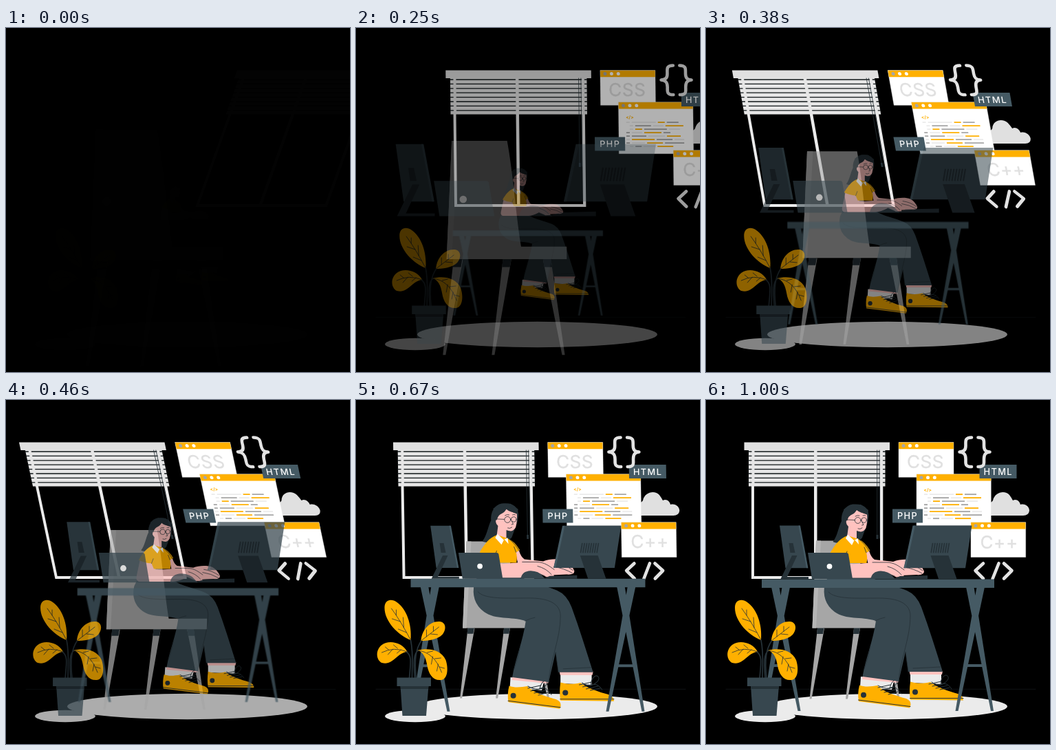
An HTML page for the animation above (1040 ms loop, 500 by 500 pixels).

```html
<!DOCTYPE html>
<html lang="en">
<head>
<meta charset="utf-8">
<title>Coding at a desk</title>
<style>
  html, body { margin: 0; width: 100%; height: 100%; overflow: hidden; background: #000; }
  svg { display: block; width: 100vw; height: 100vh; }
  text { font-family: Inter, "Open Sans", sans-serif; }
  .slate { fill: #37474f; } .steel { fill: #455a64; } .ink { fill: #263238; }
  .amber { fill: #ffb000; } .skin { fill: #ffc2bf; } .pale { fill: #ebebeb; } .gray { fill: #e0e0e0; }
  .line { fill: none; stroke: #263238; stroke-width: .8; stroke-linecap: round; stroke-linejoin: round; }
  .sign { fill: none; stroke: #e3e3e3; stroke-width: 4.6; stroke-linecap: round; stroke-linejoin: round; }
  .big { fill: #e0e0e0; stroke: #e0e0e0; stroke-width: .4; font-size: 26px; letter-spacing: .6px; }
  .tag { fill: #fff; font-size: 12.8px; font-weight: 500; letter-spacing: 1.4px; }
</style>
</head>
<body>
<svg viewBox="0 0 500 500">
  <g id="floor">
    <path d="M29 420.3H479" class="line" style="stroke-width:.4"/>
    <ellipse class="pale" cx="263.5" cy="445.5" rx="174.5" ry="18.7"/>
    <ellipse class="pale" cx="86" cy="459.5" rx="44" ry="8.7"/>
  </g>

  <g id="window">
    <path class="pale" d="M66 73h4v183h87V73h4.500v183H253V73h4.300v187H66z"/>
    <path fill="#e6e6e6" d="M62 73H260.500V125.600H62z"/>
    <g id="slats"></g>
    <path class="gray" d="M55.500 61.500H267V73H55.500z"/>
    <path class="line" d="M248.700 73V198M252 73V201"/>
    <path class="ink" d="M247.500 196h2.800v6h-2.800z"/>
  </g>

  <g id="screens">
    <path class="gray" d="M410 168V150C414 149 416 148 417 146C420 133 435 131 441 138Q444 142 446 146C451 143 456 147 457 152C464 150 470 155 470 161Q469 168 461 168z"/>
    <g id="panels"></g>
    <text class="big" x="292" y="99">CSS</text>
    <text class="big" x="398.500" y="215.500">C++</text>
    <text class="amber" x="316.500" y="132.500" font-size="6.500" font-weight="700">&lt;/&gt;</text>
    <g id="code"></g>
    <path class="steel" d="M397.500 94h54v20h-54zM271 158.500h44v20h-44z"/>
    <text class="tag" x="403.500" y="108.600">HTML</text>
    <text class="tag" x="278" y="173.100">PHP</text>
    <path class="sign" d="M386 54.500C376 54.500 377.500 60 377.500 66S376 75 368.500 75.500C376 76 377.500 80 377.500 86S376 97 386 97M395.500 54.500C405.500 54.500 404 60 404 66S405.500 75 412.500 75.500C405.500 76 404 80 404 86S405.500 97 395.500 97"/>
    <path class="sign" d="M403 237.500 391.500 248 403 259.500M425.500 237.500 416.500 260M433 237.500 444.500 248 433 259.500"/>
  </g>

  <g id="chair">
    <path fill="#a6a6a6" d="M172 332 153.500 434.500H150.500L162 332zM224 332 206 434.500H203L215 332zM258 332H266.500L281.500 434.500H278.500z"/>
    <path class="ink" d="M162 331h9.500l-1.500 9h-9zM215 331h9l-1.500 9h-8.500zM258 331h8.500l1.300 9h-8.500z"/>
    <path fill="#a6a6a6" d="M160 204.500H219.500C226 240 229 285 234.500 318H283.500V331.500H154.500z"/>
    <path fill="#b5b5b5" d="M160 204.500H167L160 331.500H154.500z"/>
  </g>

  <g id="person">
    <!-- socks and shoes -->
    <path class="pale" d="M225 402 273 409 270 421 224 417zM297 396H342V413L297 411z"/>
    <path class="skin" d="M228 401 280 407 279 411 227 406zM295.500 394H344L343 399H296.500z"/>
    <path class="amber" d="M223 414.500C232 418 242 416 249 415C258 424 276 430 291 434Q298 437 297.500 443L296 447.500 222 438Q220 427 223 414.500zM297 409.500C308 413 318 412 326 410C336 418 352 423 366 427Q374 430 374 436.500L297 435.500Q295 424 297 409.500z"/>
    <path class="line" d="M221.500 436 297 445.500M296.500 433.500H374M250 418l18-4M254 422l18-4M259 425l17-4M265 428l14-4M250 415q9 5 16 4c10-5 12 2 18 8M267 419c2-9 7-14 10-11s-3 9-10 11M324 413l18-4M329 416l18-4M334 419l17-4M340 421l14-3M328 410q7 5 13 4c7-4 12 0 16 6M341 414c-1-8 6-17 10-13s-2 10-10 13" style="stroke-width:1"/>
    <g class="ink"><circle cx="229" cy="428.700" r="4"/><circle cx="304" cy="424.500" r="4"/></g>
    <!-- trousers -->
    <path class="slate" d="M178 256H238C252 266 276 270 292 277Q306 283 313 301C324 331 334 363 344 395H294L290 366 280 409 227.500 402C232 375 243 350 247 321C224 314 204 320 187 308Q167 293 173 266z"/>
    <path class="line" d="M178 279C188 290 218 288 252 288C280 288 297 296 297 314C297 346 282 378 280 409M290 366 294 395M246 321Q254 317 260 316M230 391Q236 374 239 358M301 390 341 388"/>
    <!-- hair and head -->
    <path class="ink" d="M197 176C196 162 204 151 216 151.500C229 151 236 157 236.500 168L235 178 227 200C223 208 190 210 184.500 206C191 198 192 186 197 176z"/>
    <path class="skin" d="M206 165C212 166 216 164 219 160Q225 165 234 165Q235 177 232.500 186Q229 193 222 191L219 190V203Q211 209 205 199L207 184Q201 178 206 173z"/>
    <path class="ink" d="M205 176Q207 168 213 166Q218 164 220 156Q224 164 235 167L236 160 225 152H212L200 159z"/>
    <path class="line" d="M204 174 216 174.500M225 174.500h1M227 177.500l2 4-2.500.500M221 187q3 1.500 6-1M217 169q3-2 6-1M228 168q2-1 4 0"/>
    <g class="line"><circle cx="220.700" cy="175" r="4.400"/><circle cx="229.600" cy="174.600" r="3.700"/></g>
    <!-- arms and shirt: the far hand reaches behind the monitor -->
    <path class="skin" d="M232 221 237 219Q240 229 245 232L272 235C282 231 296 231 304 234Q313 239 317 249Q317 255 306 254L284 255 262 250 236 240z"/>
    <path class="skin" d="M183 221 206 224 209 238C226 239 240 235 262 236C274 236 281 242 288 247Q292 251 287 254L288 257 277 257.500 262 251Q249 258 238 258.500H181Q175 257 177 249z"/>
    <path class="amber" d="M206 197C194 201 188 210 180.500 222Q190 227 202 228L206 237H233.500Q235 228 233 222L238.500 219Q231 206 221 202z"/>
    <path fill="#fff" d="M206 195.500 203 201 212 211 216 203 222 210 221 201 215 204z"/>
    <path class="line" d="M222 202Q232 210 237.500 220M202 228 205 220M233 222 230 214M242 236H262C274 236 281 242 288 247M264 242Q276 245 284 254M290 238Q304 240 315 248M288 243Q302 245 314 252M262 251 274 256"/>
  </g>

  <g id="desk" class="steel">
    <path id="trestle" d="M378 272H389.500L418 452H414zM393.500 272H405L366.500 452H362.500zM378 384H403.500V388H378z"/>
    <use href="#trestle" transform="matrix(-1 0 0 1 500 0)"/>
    <path d="M81 260.500H419V273H81z"/>
  </g>

  <g id="devices">
    <path class="slate" d="M107 182.500H136L148 244.300H115.500z"/>
    <path class="steel" d="M134.500 182.500H137L148.500 244.300H146z"/>
    <path class="ink" d="M120.500 208H126.500L129.500 222H122.500zM125 226H132.500L118 257H149V260H108.500z"/>
    <path class="slate" d="M148 222H204Q206.500 222 207 224L213 260H154z"/>
    <circle cx="179.500" cy="241.800" r="3.900" fill="#fff"/>
    <path class="ink" d="M282 256 322 255V260H272z"/>
    <path class="slate" d="M239.500 260Q241 249 254 248.500Q266 249 271 256L275 260zM303 182.500H386.500L377 244.300H287.500z"/>
    <path class="steel" d="M300.500 182.500H304L290.500 244.300H287.500z"/>
    <path class="ink" d="M326.500 226H352.500L364.500 260H338z"/>
    <g id="vents"></g>
  </g>

  <g id="plant">
    <path class="line" style="stroke-width:1.700" d="M82 404C82 382 84 368 80 349M88 404C85 378 87 362 96 349M78 404C80 382 82 372 74 366M86 404C84 382 84 368 91 364"/>
    <path class="amber" d="M80 349C62 342 42 322 42 302C42 290 52 288 60 294C74 304 82 326 80 349zM95 350C96 334 108 321 122 322C132 323 132 334 126 341C118 349 104 350 95 350zM75 366C68 352 48 348 38 356C28 364 30 378 38 382C54 387 60 367 75 366zM90 364C104 360 124 362 131 378C135 390 134 406 124 407C112 408 106 398 104 386C102 374 98 366 90 364z"/>
    <path class="line" d="M52 303Q66 322 80 349M59 313V305M65 322 53 318M70 331 69 316M74 338 62 333M95 350Q108 340 121 330M103 344V334M109 340 119 341M113 336V329M38 367Q56 358 75 366M48 363 43 359M54 362 47 370M61 361 55 356M66 363 60 368M90 364Q114 366 125 396M104 367 112 365M112 373 110 384M115 376 124 375M120 384 118 394M122 388 129 390"/>
    <path class="slate" d="M65 415H106L102.500 459H68z"/>
    <path class="ink" d="M65 415H106L105.500 420H65.500z"/>
    <path class="slate" d="M60 403.500H109.500V416H60z"/>
  </g>
</svg>
<script>
const el = id => document.getElementById(id);
const rect = (x, y, w, h, fill) => `<rect x="${x}" y="${y}" width="${w}" height="${h}" fill="${fill}"/>`;

// Blinds
let out = '';
for (let i = 0; i < 8; i++) {
  const y = 75 + i * 6.4;
  out += `<path d="M61 ${y}h5.500m4 0H157m4.500 0H253m4 0h4.500" stroke="#111719" stroke-width="1.300"/>`;
}
el('slats').innerHTML = out;

// Browser panels
const panel = (x, y, w, h) => rect(x, y, w, h, '#fff') + rect(x, y, w, 9.7, '#ffb000') +
  `<path d="M${x} ${y}h${w}v${h}h${-w}z" fill="none" stroke="#e0e0e0" stroke-width=".4"/>` +
  [7, 16.5, 26.3].map((d, i) =>
    `<circle cx="${x + d}" cy="${y + 5}" r="2.500" fill="${i ? '#fff' : '#a6a6a6'}"/>`).join('');
el('panels').innerHTML = panel(280, 61.5, 80, 50.8) + panel(306, 107.7, 108.3, 75) + panel(385, 177.7, 79.7, 50.8);

// Code: each row is a start, then colour and length of its pieces
const tints = { l: '#ebebeb', g: '#a6a6a6', o: '#ffb000' };
const rows = ['317 l5 l35 o10 g17', '322 l5 g23 l15 o26', '322 l5 o10 g33 l16', '317 g5 l15 o25 g10',
  '317 g5 g21 l24 o20', '317 l5 o33 g23 l14', '317 g5 l19 o23 g28', '322 l5 g9 l17 o23'];
el('code').innerHTML = rows.map((row, i) => {
  let [x, ...parts] = row.split(' ');
  x = +x;
  return parts.map(p => {
    const w = +p.slice(1), r = rect(x, 136.2 + i * 5, w, 1.9, tints[p[0]]);
    x += w + 3;
    return r;
  }).join('');
}).join('');

out = '';
for (let i = 0; i < 8; i++) out += `M${329.5 + i * 3.4} 208.500l-2.200 13`;
el('vents').innerHTML = `<path class="line" d="${out}" style="stroke-width:1.700"/>`;

// Cubic Bezier ease with overshoot
const bez = (s, a, b) => 3 * (1 - s) ** 2 * s * a + 3 * (1 - s) * s * s * b + s ** 3;
function ease(x) {
  if (x <= 0 || x >= 1) return x <= 0 ? 0 : 1;
  let lo = 0, hi = 1;
  for (let i = 0; i < 30; i++) {
    const mid = (lo + hi) / 2;
    if (bez(mid, .36, .5) < x) lo = mid; else hi = mid;
  }
  return bez(lo, -.01, 1.38);
}

function pose(id, transform, opacity) {
  el(id).setAttribute('transform', transform);
  el(id).setAttribute('opacity', Math.max(0, Math.min(1, opacity)));
}
const zoom = (cx, cy, s) => `translate(${cx} ${cy}) scale(${s}) translate(${-cx} ${-cy})`;
const tan = deg => Math.tan(deg * Math.PI / 180);
const mix = (a, b, k) => a + (b - a) * k;

function draw(p) {
  const e = ease(p), grow = .5 + e / 2, shrink = 1.5 - e / 2;
  pose('floor', '', e);
  pose('chair', zoom(219, 319, shrink), e);
  pose('person', zoom(272.5, 299.5, grow), e);
  pose('desk', zoom(250, 356, grow), e);
  pose('devices', zoom(246.5, 221.5, shrink), e);
  pose('plant', `translate(${30 * (1 - e)} 0)`, e);

  // Window and screens rush in from the right, leaning, then swing upright
  const enter = ease(p / .6);
  const lean = p < .6 ? mix(tan(-20), tan(10), enter)
    : p < .8 ? mix(tan(10), tan(-2), ease((p - .6) / .2))
    : mix(tan(-2), 0, ease((p - .8) / .2));
  const rush = cy => `matrix(1 0 ${lean} 1 ${249 * (1 - enter) - cy * lean} 0)`;
  pose('window', rush(157), enter);
  pose('screens', rush(147), enter);
}

const LOOP = 1040, STEP = 1000 / 24;
function tick() {
  let n = Math.floor((performance.now() % LOOP + 5.1) / STEP);
  if (n < 2) n = 0;
  draw(Math.min(1, n / 24 + .035));
  requestAnimationFrame(tick);
}
tick();
</script>
</body>
</html>
```
